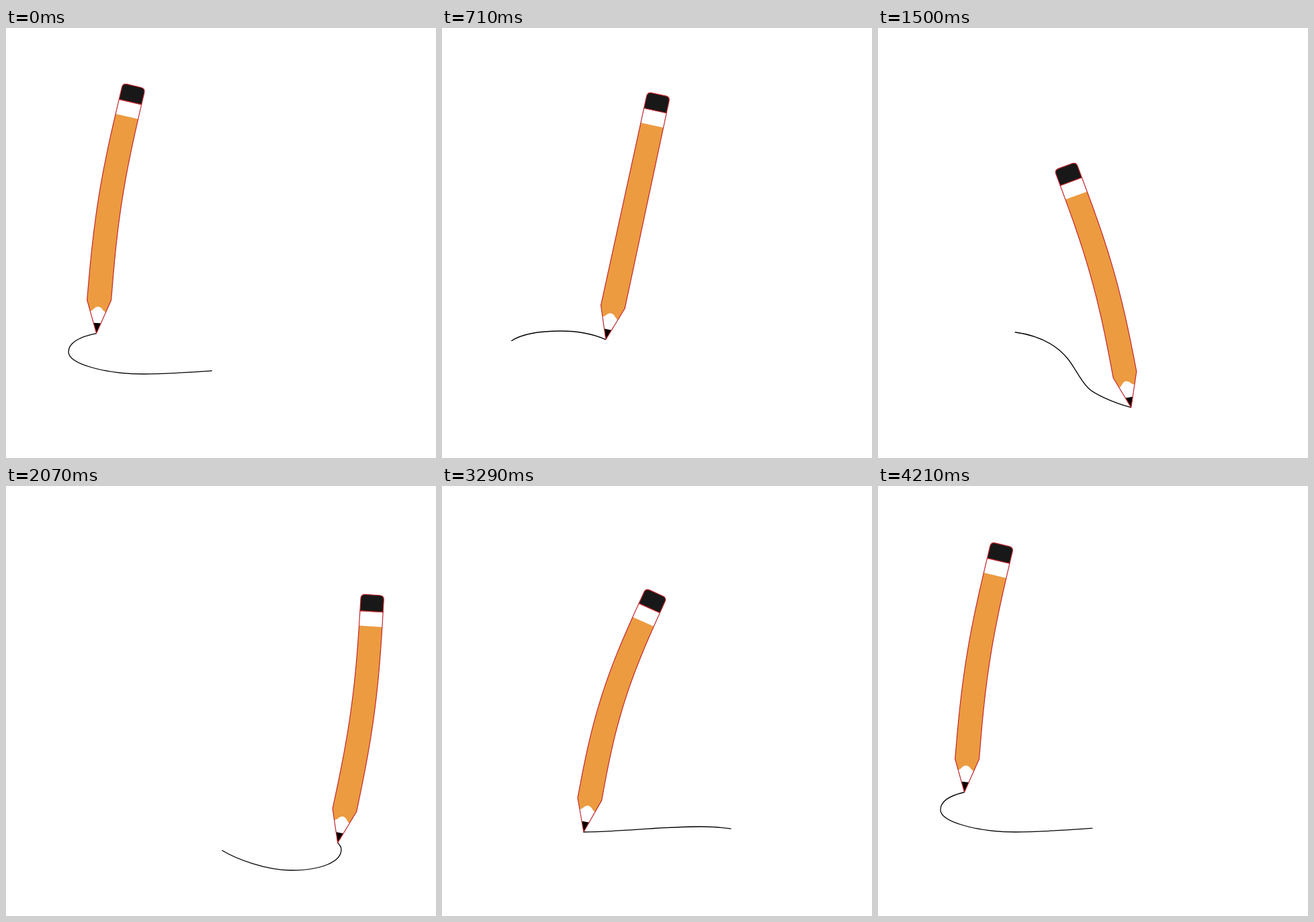
These frames come from a looping animation (640x640 px, 4.28 s). An HTML page:

```html
<!DOCTYPE html>
<html lang="en">
<head>
<meta charset="utf-8">
<title>Pencil loop</title>
<style>
  html, body { margin: 0; width: 100%; height: 100%; overflow: hidden; background: #fff; }
  svg { display: block; width: 100%; height: 100%; }
  .outline { stroke: #c0282f; stroke-width: 1.2; stroke-linejoin: round; }
</style>
</head>
<body>
<svg viewBox="0 0 640 640">
  <path id="trail" fill="none" stroke="#000" stroke-width="1.3" d="M93 482
    C93 463 127 451 177 451 S263 468 283 493
    C294 507 301 524 313 536 S380 572 425 572
    S499 559 499 541 S445 507 385 507
    S262 515 205 515 S93 500 93 482Z"/>
  <path id="wood" fill="#fff"/>
  <path id="paint" fill="#ec9b40"/>
  <path id="lead"/>
  <path id="edge" class="outline" fill="none"/>
  <path id="eraser" class="outline" fill="#181818"/>
</svg>
<script>
const LOOP = 4280, STEPS = 60, RAD = Math.PI / 180;
const el = id => document.getElementById(id);
const draw = (id, d) => el(id).setAttribute('d', d);
const trail = el('trail');
const total = trail.getTotalLength();

// Key poses; leans are degrees from upright, at the tip and at the eraser.
const poses = [
  { time: 0, tip: [134.5, 455], lean: 4.7, top: 13.2 },
  { time: 710, tip: [243, 464], lean: 12.2, top: 12.2 },
  { time: 1140, tip: [302, 522], lean: 9, top: 5 },
  { time: 1500, tip: [376.5, 567], lean: -10.8, top: -20.5 },
  { time: 2070, tip: [494, 530], lean: 12, top: 3.5 },
  { time: 2640, tip: [377, 507], lean: 24.7, top: 24.6 },
  { time: 3290, tip: [209, 515], lean: 10.3, top: 24.3 },
  { time: 4210, tip: [129, 456], lean: 4.7, top: 13.3 }
];

// Distance along the curve of the point nearest to (x, y).
function distanceAt([x, y]) {
  let best = Infinity, found = 0;
  for (let s = 0; s < total; s += 0.5) {
    const p = trail.getPointAtLength(s), gap = Math.hypot(p.x - x, p.y - y);
    if (gap < best) { best = gap; found = s; }
  }
  return found;
}

// Smooth periodic curve through the poses; each loop adds `gain`.
function track(values, gain = 0) {
  const n = poses.length;
  const key = i => {
    const turn = Math.floor(i / n), k = i - turn * n;
    return [poses[k].time + turn * LOOP, values[k] + turn * gain];
  };
  const span = i => key(i + 1)[0] - key(i)[0];
  const slope = i => (key(i + 1)[1] - key(i)[1]) / span(i);
  const tangent = i => (span(i) * slope(i - 1) + span(i - 1) * slope(i)) / (span(i - 1) + span(i));
  return time => {
    const i = poses.findLastIndex(pose => pose.time <= time);
    const u = (time - key(i)[0]) / span(i), a = key(i)[1], b = key(i + 1)[1];
    return a + (b - a) * u * u * (3 - 2 * u)
      + span(i) * u * (1 - u) * ((1 - u) * tangent(i) - u * tangent(i + 1));
  };
}

const start = distanceAt(poses[0].tip);
const travelled = track(poses.map(({ tip }) => {
  const s = distanceAt(tip);
  return s < start ? s + total : s;
}), total);
const lean = track(poses.map(pose => pose.lean));
const topLean = track(poses.map(pose => pose.top));

// The trail stretches and shrinks as a sum of harmonics of the loop.
function trailLength(time) {
  const wave = (n, size, phase) => size * Math.cos((n * 360 * time / LOOP + phase) * RAD);
  return 210 + wave(1, 32, 42) + wave(2, 42, 54) + wave(3, 15, -14) + wave(4, 5, 0);
}

// Pencil measures, as distances from the tip.
const SHOULDER_LEFT = 48.3, SHOULDER_RIGHT = 51.2, BAND = 326.4, NECK = 348.7, TOP = 373.3;
const half = s => 17.9 - (s - 50) / 400;

// Maps (distance from tip, sideways offset) to the stage along a bent spine.
function bentSpine(x, y, lean0, lean1) {
  const step = 2, nodes = [[x, y]];
  const angle = s => {
    const u = Math.min(1, Math.max(0, (s - 50) / 300));
    return (lean0 + (lean1 - lean0) * u * u * (3 - 2 * u)) * RAD;
  };
  for (let s = step / 2; s < TOP + step; s += step) {
    x += Math.sin(angle(s)) * step;
    y -= Math.cos(angle(s)) * step;
    nodes.push([x, y]);
  }
  return (s, p) => {
    const i = Math.floor(s / step), f = s - i * step;
    const sin = Math.sin(angle(s)), cos = Math.cos(angle(s));
    const px = nodes[i][0] + sin * f + cos * p;
    const py = nodes[i][1] - cos * f + sin * p;
    return px.toFixed(2) + ' ' + py.toFixed(2);
  };
}

function drawPencil(at) {
  const side = (sign, from, to) => Array.from({ length: 41 }, (_, i) => {
    const s = from + (to - from) * i / 40;
    return at(s, sign * half(s));
  });
  const hull = to => [...side(-1, SHOULDER_LEFT, to), ...side(1, to, SHOULDER_RIGHT)].join('L');
  const shell = `M${at(0, 0)}L${hull(NECK)}Z`;
  draw('wood', shell);
  draw('edge', shell);
  draw('paint', `M${at(32.5, -11.8)}L${hull(BAND)}L${at(32.5, 11.4)}`
    + `C${at(33.5, 6.5)} ${at(39.8, 5.5)} ${at(39.8, -0.5)}`
    + `C${at(39.8, -6)} ${at(33.5, -7)} ${at(32.5, -11.8)}Z`);
  draw('lead', `M${at(0, 0)}L${at(15.4, -5.7)}L${at(15.4, 5.6)}Z`);
  const w = half(NECK), r = 6.5;
  draw('eraser', `M${at(NECK, -w)}L${at(TOP - r, -w)}`
    + `Q${at(TOP, -w)} ${at(TOP, r - w)}L${at(TOP, w - r)}`
    + `Q${at(TOP, w)} ${at(TOP - r, w)}L${at(NECK, w)}Z`);
}

function render(elapsed) {
  const step = Math.floor((elapsed % LOOP) * STEPS / LOOP + 0.06) % STEPS;
  const time = step * LOOP / STEPS;
  const tip = travelled(time), length = trailLength(time);
  trail.setAttribute('stroke-dasharray', `${length} ${total - length}`);
  trail.setAttribute('stroke-dashoffset', total - (tip - length + total) % total);
  const p = trail.getPointAtLength(tip % total);
  drawPencil(bentSpine(p.x, p.y, lean(time), topLean(time)));
}

let origin;
function tick(now) {
  origin ??= now;
  render(now - origin);
  requestAnimationFrame(tick);
}
render(0);
requestAnimationFrame(tick);
</script>
</body>
</html>
```
